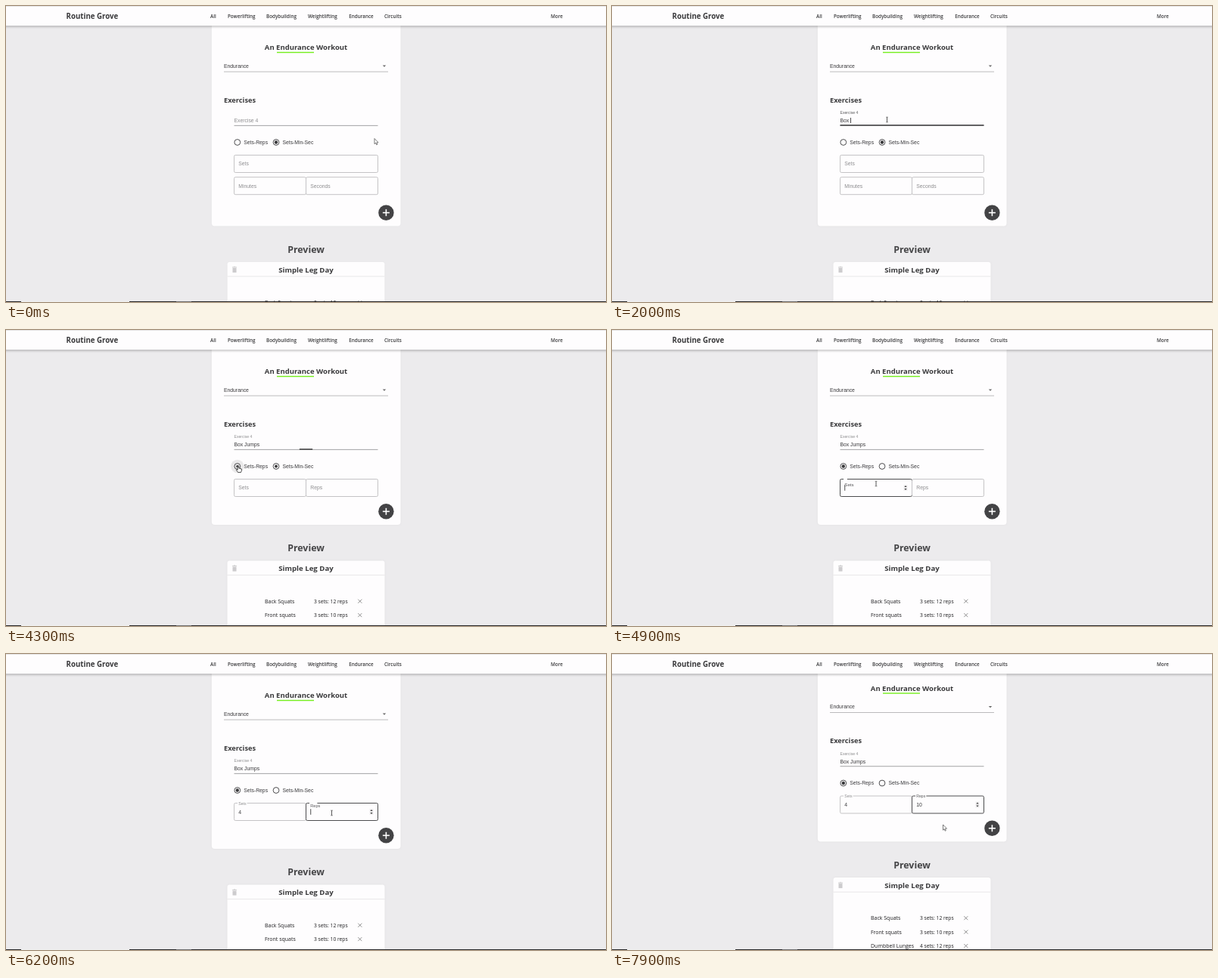
An HTML page with a canvas that plays this animation: 793 px wide and 392 px high, repeating every 8000 ms.

```html
<!DOCTYPE html>
<html lang="en">
<head>
<meta charset="utf-8">
<title>Workout form</title>
<style>
  html, body { margin: 0; width: 100%; height: 100%; overflow: hidden; background: #ecebed; }
  canvas { display: block; width: 793px; height: 392px; }
</style>
</head>
<body>
<canvas id="stage" width="793" height="392"></canvas>
<script>
const ctx = document.getElementById('stage').getContext('2d');
const LOOP = 8000, STEP = 100;
const HEAD = '"Open Sans", "Noto Sans", sans-serif';
const FORM = '"Liberation Sans", Arial, sans-serif';
const INK = '#39393b', GREY = '#8d8d8f', RULE = '#b4b3b5', PAPER = '#fefdfe', FORM_SIZE = 6.8;

// Moments of the interaction, in ms
const NAME_FOCUS = 450, NAME_BLUR = 4190, RADIO_PRESS = 4250, RADIO_SWAP = 4300;
const SETS_FOCUS = 4870, REPS_FOCUS = 6130, SCROLL_START = 7730;
const NAME_KEYS = [1400, 1500, 1700, 1800, 2200, 2400, 2600, 2700, 2800];
const SETS_KEYS = [5400], REPS_KEYS = [6900, 7000];

// Pointer hot spot: time, x, y
const POINTER = [
  [0, 487, 175.5], [500, 363.5, 150.5], [800, 363.5, 150.5], [3200, 363.5, 150.5],
  [3600, 363, 156.5], [4200, 307, 180], [4500, 307, 180], [4900, 349, 203.5],
  [5300, 349, 209], [5700, 349, 209], [6200, 430.5, 210.5], [6500, 437.5, 226], [LOOP, 437.5, 226]
];

const clamp = v => Math.max(0, Math.min(1, v));
const mix = (a, b, p) => a + (b - a) * p;
const smooth = p => p * p * (3 - 2 * p);
const progress = (t, start, length) => clamp((t - start) / length);
const easeOut = p => 1 - (1 - p) ** 3;
const typed = (word, keys, t) => word.slice(0, keys.filter(k => k <= t).length);

function caretOn(t, focus, keys) {
  const last = Math.max(focus, ...keys.filter(k => k <= t));
  return Math.floor((t - last) / 530) % 2 === 0;
}

// y is the middle of the capital letters
function text(str, x, y, size, { font = FORM, weight = 400, color = INK, align = 'left' } = {}) {
  ctx.font = `${weight} ${size}px ${font}`;
  ctx.textAlign = align;
  ctx.fillStyle = color;
  ctx.fillText(str, x, y + size * 0.36);
}

function heading(str, x, y, size, { align = 'left', weight = 700, color = INK } = {}) {
  text(str, x, y, size, { font: HEAD, weight, color, align });
}

function formWidth(str, size = FORM_SIZE) {
  ctx.font = `${size}px ${FORM}`;
  return ctx.measureText(str).width;
}

function rect(x, y, w, h, color) {
  ctx.fillStyle = color;
  ctx.fillRect(x, y, w, h);
}

function disc(x, y, r, color) {
  ctx.fillStyle = color;
  ctx.beginPath();
  ctx.arc(x, y, r, 0, Math.PI * 2);
  ctx.fill();
}

function line(points, color, width = 1) {
  ctx.strokeStyle = color;
  ctx.lineWidth = width;
  ctx.beginPath();
  points.forEach(([x, y], i) => i ? ctx.lineTo(x, y) : ctx.moveTo(x, y));
  ctx.stroke();
}

function shape(points, fill, stroke, width = 0.8) {
  ctx.beginPath();
  points.forEach(([x, y]) => ctx.lineTo(x, y));
  ctx.closePath();
  ctx.fillStyle = fill;
  ctx.fill();
  if (!stroke) return;
  ctx.strokeStyle = stroke;
  ctx.lineWidth = width;
  ctx.stroke();
}

function card(x, y, w, h, radius) {
  ctx.save();
  ctx.shadowColor = 'rgba(0,0,0,.05)';
  ctx.shadowBlur = 2;
  ctx.fillStyle = PAPER;
  ctx.beginPath();
  ctx.roundRect(x, y, w, h, radius);
  ctx.fill();
  ctx.restore();
}

function nav() {
  const shade = ctx.createLinearGradient(0, 26, 0, 30);
  shade.addColorStop(0, 'rgba(0,0,0,.2)');
  shade.addColorStop(1, 'rgba(0,0,0,0)');
  rect(0, 26, 793, 4, shade);
  rect(0, 0, 793, 26, PAPER);
  rect(0, 0, 793, 1, '#e6e5e7');
  heading('Routine Grove', 79.5, 13.5, 9.7);
  const links = [['All', 270], ['Powerlifting', 293], ['Bodybuilding', 344],
    ['Weightlifting', 399], ['Endurance', 453.3], ['Circuits', 500], ['More', 720]];
  links.forEach(([label, x]) => heading(label, x, 13.5, 6.3, { weight: 600 }));
}

function nameField(t) {
  const focused = t >= NAME_FOCUS && t < NAME_BLUR;
  const up = easeOut(progress(t, NAME_FOCUS, 200));
  const value = typed('Box Jumps', NAME_KEYS, t);
  text('Exercise 4', 301.5, mix(151.7, 141.5, up), FORM_SIZE * mix(1, 0.75, up),
    { color: focused ? '#59595b' : GREY });
  if (!value && t > NAME_FOCUS) {
    const alpha = 0.42 * progress(t, NAME_FOCUS, 200);
    text('e.g. Incline Bench Press', 301.5, 151.7, FORM_SIZE, { color: `rgba(40,40,42,${alpha})` });
  }
  text(value, 301.5, 151.7, FORM_SIZE);
  if (focused && caretOn(t, NAME_FOCUS, NAME_KEYS)) rect(301.5 + formWidth(value), 148, 0.9, 7, INK);

  rect(301.5, 157.9, 190, 0.8, GREY);
  const bar = 190 * (t < NAME_BLUR ? up : 1 - easeOut(progress(t, NAME_BLUR, 200)));
  rect(396.5 - bar / 2, 157.2, bar, 1.4, INK);
}

function radio(x, label, dot) {
  ctx.strokeStyle = INK;
  ctx.lineWidth = 0.9;
  ctx.beginPath();
  ctx.arc(x, 180.5, 3.9, 0, Math.PI * 2);
  ctx.stroke();
  if (dot > 0) disc(x, 180.5, 2.2 * dot, INK);
  text(label, x + 8.5, 180.3, FORM_SIZE);
}

function radios(t) {
  const p = progress(t, RADIO_PRESS, 150);
  if (t >= 4200 && t < SETS_FOCUS) disc(305.8, 180.5, 8.7, 'rgba(0,0,0,.08)');
  radio(305.8, 'Sets-Reps', easeOut(p));
  radio(357, 'Sets-Min-Sec', 1 - p * p);
}

function spinner(x, y) {
  rect(x - 2.6, y - 4, 5.2, 8, '#f0eff0');
  shape([[x - 1.7, y - 0.9], [x, y - 3], [x + 1.7, y - 0.9]], '#444');
  shape([[x - 1.7, y + 0.9], [x, y + 3], [x + 1.7, y + 0.9]], '#444');
}

// Outlined input whose label slides into a notch in the top border
function outlined(label, x, y, w, { t = 0, focus = Infinity, blur = Infinity, word = '', keys = [] } = {}) {
  const h = 23, mid = y + h / 2;
  const up = easeOut(progress(t, focus, 200));
  const focused = t >= focus && t < blur;
  const size = FORM_SIZE * mix(1, 0.75, up);

  ctx.strokeStyle = focused ? '#4c4c4e' : '#c4c3c5';
  ctx.lineWidth = 1;
  ctx.beginPath();
  ctx.roundRect(x, y, w, h, 1.8);
  ctx.stroke();
  if (up > 0) rect(x + 4.5, y - 1, up * (formWidth(label, 5.1) + 2.4), 2, PAPER);
  text(label, x + 5.8, mix(mid, y + 0.2, up), size, { color: focused ? '#59595b' : GREY });

  const value = typed(word, keys, t);
  text(value, x + 5.8, mid + 0.1, FORM_SIZE);
  if (!focused) return;
  spinner(x + w - 8.5, mid);
  if (caretOn(t, focus, keys)) rect(x + 5.8 + formWidth(value), mid - 3.8, 0.9, 7.6, INK);
}

function measures(t) {
  if (t < RADIO_SWAP) {
    outlined('Sets', 301.5, 197.5, 190);
    outlined('Minutes', 301.5, 226.7, 95);
    outlined('Seconds', 396.5, 226.7, 95);
    return;
  }
  outlined('Sets', 301.5, 197.5, 95, { t, focus: SETS_FOCUS, blur: REPS_FOCUS, word: '4', keys: SETS_KEYS });
  outlined('Reps', 396.5, 197.5, 95, { t, focus: REPS_FOCUS, word: '10', keys: REPS_KEYS });
}

function addButton(x, y) {
  disc(x, y, 10.2, '#434345');
  rect(x - 4.5, y - 0.8, 9, 1.6, '#fff');
  rect(x - 0.8, y - 4.5, 1.6, 9, '#fff');
}

function trash(x, y) {
  const color = '#cdccce';
  rect(x - 3, y - 3.5, 6, 1, color);
  rect(x - 1.2, y - 4.2, 2.4, 0.8, color);
  rect(x - 2.5, y - 2, 5, 6, color);
}

function preview(shift) {
  ctx.save();
  ctx.translate(0, shift);
  heading('Preview', 396.5, 322.3, 12.4, { align: 'center', color: '#454547' });
  card(292.5, 339, 208, 140, 3);
  rect(292.5, 357.6, 208, 0.9, '#e6e5e7');
  trash(302, 349);
  heading('Simple Leg Day', 396.5, 349.3, 9.65, { align: 'center' });
  const rows = [['Back Squats', '3 sets: 12 reps'], ['Front squats', '3 sets: 10 reps'],
    ['Dumbbell Lunges', '4 sets: 12 reps']];
  const style = { font: HEAD, color: '#1c1c1e' };
  rows.forEach(([name, amount], i) => {
    const y = 392.6 + i * 18.4;
    text(name, 342, y, 7, style);
    text(amount, 407, y, 6.7, style);
    line([[465.3, y - 2.5], [470.3, y + 2.5]], '#777', 0.8);
    line([[470.3, y - 2.5], [465.3, y + 2.5]], '#777', 0.8);
  });
  ctx.restore();
}

function taskbar() {
  rect(0, 391, 793, 1, '#29292b');
  rect(20, 391, 143, 1, '#f0f0f0');
  rect(225, 391, 20, 1, '#6f6f72');
}

function pointer(t) {
  const i = POINTER.findIndex(k => k[0] > t);
  const [a, b] = [POINTER[i - 1], POINTER[i]];
  const p = smooth(progress(t, a[0], b[0] - a[0]));
  const x = mix(a[1], b[1], p), y = mix(a[2], b[2], p);
  const inField = (y > 144 && y < 158) || (y > 198 && y < 221);
  const onRadio = y > 175 && y < 187 && x < 408;

  ctx.save();
  ctx.translate(x, y);
  if (inField) {
    line([[0, -3.2], [0, 3.2]], '#444', 0.9);
    line([[-1.4, -3.3], [1.4, -3.3]], '#555', 0.7);
    line([[-1.4, 3.3], [1.4, 3.3]], '#555', 0.7);
  } else if (onRadio) {
    shape([[-0.8, 0], [0.6, 0], [0.8, 3], [4.3, 4], [4.4, 6.3], [3.4, 8.6], [-0.4, 8.6],
      [-2.7, 5.2], [-2, 4.4], [-0.8, 5.3]], '#fff', '#222');
  } else {
    shape([[0, 0], [0, 7.2], [1.6, 5.8], [2.7, 8.3], [3.8, 7.8], [2.8, 5.4], [5, 5.2]], '#fff', '#444', 0.7);
  }
  ctx.restore();
}

function draw(t) {
  const shift = t < RADIO_SWAP ? 0 : -33.4;
  const scroll = 9.5 * smooth(progress(t, SCROLL_START, 170));
  rect(0, 0, 793, 392, '#ecebed');

  ctx.save();
  ctx.translate(0, -scroll);
  card(271.8, 0, 249.8, 291.5 + shift, 4);
  heading('An Endurance Workout', 396.5, 54.8, 9.5, { align: 'center' });
  rect(358, 60.8, 49, 1.4, '#74ee1c');
  text('Endurance', 288, 79.2, FORM_SIZE);
  shape([[497.8, 78.4], [502.2, 78.4], [500, 80.7]], '#666');
  rect(288, 86.6, 217, 0.9, RULE);
  heading('Exercises', 288, 124.3, 9.25);
  nameField(t);
  radios(t);
  measures(t);
  addButton(502.4, 273.7 + shift);
  preview(shift);
  ctx.restore();

  nav();
  taskbar();
  pointer(t);
}

function tick(now) {
  draw(Math.floor((now % LOOP) / STEP) * STEP);
  requestAnimationFrame(tick);
}
requestAnimationFrame(tick);
</script>
</body>
</html>
```
